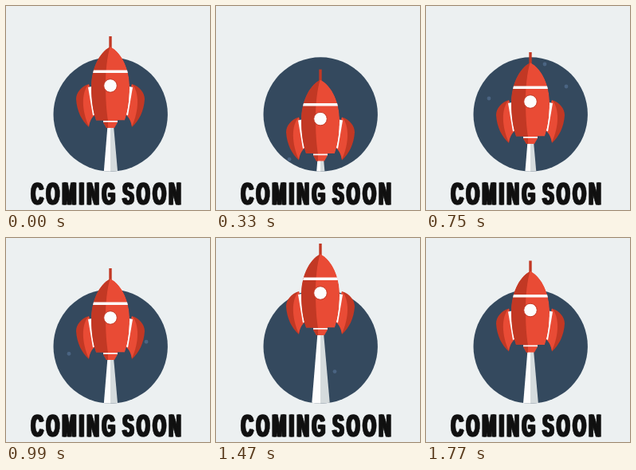
Recreate the animation shown at these times as an HTML page. Size 256x256 px, loop 1830 ms.

```html
<!DOCTYPE html>
<html lang="en">
<head>
<meta charset="utf-8">
<title>Coming soon</title>
<style>
html, body { margin: 0; width: 100%; height: 100%; overflow: hidden; background: #ecf0f1; }
svg { display: block; width: 100vw; height: 100vh; }
.red { fill: #e94b35; }
.dark { fill: #c23824; }
.white { fill: #fdfdfd; }
text {
  font: bold 38.5px "Liberation Sans", Arial, sans-serif;
  letter-spacing: 7px; word-spacing: -7.4px;
  fill: #111; stroke: #111; stroke-width: .8px;
}
</style>
</head>
<body>
<svg viewBox="0 0 256 256">
  <defs>
    <clipPath id="disc"><circle cx="131.2" cy="136" r="71.7"/></clipPath>
    <clipPath id="hull"><path id="body" d="M0-49C15-41 24-20 24 2C24 18 22 32 18 43.5H-18C-22 32-24 18-24 2C-24-20-15-41 0-49Z"/></clipPath>
    <g id="fin">
      <path class="dark" d="M-27-2C-37 1-43 9-43 17C-42 32-36 44-27 52C-26 45-24 40-19 36Z"/>
      <path class="red" d="M-27-2C-37 8-36 32-27 51C-26 45-24 40-19 36Z"/>
      <path class="white" d="M-28 2L-23.5 1L-17.5 35L-22 37.5Z"/>
    </g>
  </defs>
  <circle cx="131.2" cy="136" r="71.7" fill="#34495e"/>
  <g clip-path="url(#disc)">
    <g id="stars" fill="#4a6482"></g>
    <g class="ship">
      <path class="white" d="M-3.5 50H0V160H-12.5Z"/>
      <path fill="#d5dbdd" d="M0 50H4L13.7 160H0Z"/>
    </g>
  </g>
  <g class="ship">
    <use href="#fin"/>
    <use href="#fin" transform="scale(-1 1)"/>
    <path class="dark" d="M-1.7-62H1.7V-46H-1.7Z"/>
    <path class="red" d="M-9 42H9V46L5 53H-5L-9 46Z"/>
    <path class="dark" d="M-9 42H-3V53H-5L-9 46Z"/>
    <path class="white" d="M-9 44H9V45.7H-9Z"/>
    <g clip-path="url(#hull)">
      <use href="#body" class="red"/>
      <path class="dark" d="M0-50C-4-38-6-18-6-2C-6 16-5 32-3 44H-30V-50Z"/>
      <path class="white" d="M-26-19.5H26V-16H-26Z"/>
    </g>
    <circle class="white" r="8.3" stroke="#c23824" stroke-width="1"/>
  </g>
  <!-- side copies thicken only the upright strokes -->
  <text id="title" transform="translate(31.6 248.8) scale(.545 1)">COMING SOON</text>
  <use href="#title" x="-1.4"/>
  <use href="#title" x="1.4"/>
</svg>
<script>
const LOOP = 1830;
// [time, height of the porthole]
const keys = [[0, 100], [150, 128], [360, 142], [510, 140], [750, 120], [990, 100],
  [1050, 95], [1290, 78], [1470, 69], [1590, 65.5], [1770, 90.5]];
// x, y at 750 ms, first and last visible moment
const stars = [[79, 116, 480, 1470], [149, 73, 600, 1770],
  [176, 101, 540, 1470], [92, 245, 60, 390]];

const ships = document.querySelectorAll('.ship');
const dots = stars.map(([x]) => {
  const dot = document.createElementNS('http://www.w3.org/2000/svg', 'circle');
  dot.setAttribute('cx', x);
  dot.setAttribute('r', 2.4);
  return document.getElementById('stars').appendChild(dot);
});

function key(i) {
  const n = keys.length, lap = Math.floor(i / n), [t, y] = keys[i - lap * n];
  return [t + lap * LOOP, y];
}

function slope(i) {
  const [t0, y0] = key(i), [t1, y1] = key(i + 1);
  return (y1 - y0) / (t1 - t0);
}

// Harmonic mean keeps the curve from overshooting its turning points
function tangent(i) {
  const a = slope(i - 1), b = slope(i);
  return a * b > 0 ? 2 * a * b / (a + b) : 0;
}

function height(t) {
  const i = keys.findLastIndex(k => k[0] <= t);
  const [t0, y0] = key(i), [t1, y1] = key(i + 1);
  const d = t1 - t0, u = (t - t0) / d, v = 1 - u;
  return y0 * v * v * (1 + 2 * u) + y1 * u * u * (3 - 2 * u)
    + d * u * v * (tangent(i) * v - tangent(i + 1) * u);
}

// Short steps during the fast drop, longer ones afterwards
function step(t) {
  return t < 210 ? Math.floor(t / 30) * 30 : 210 + Math.floor((t - 210) / 60) * 60;
}

function draw(now) {
  const t = step(now % LOOP), dt = t - 750;
  const y = height(t);
  ships.forEach(s => s.setAttribute('transform', `translate(131 ${y})`));
  stars.forEach(([, y0, from, to], i) => {
    dots[i].setAttribute('cy', y0 + .117 * dt + .00002 * dt * Math.abs(dt));
    dots[i].setAttribute('opacity', t >= from && t <= to ? 1 : 0);
  });
}

const start = performance.now();
function tick() {
  draw(performance.now() - start);
  requestAnimationFrame(tick);
}
tick();
</script>
</body>
</html>
```
